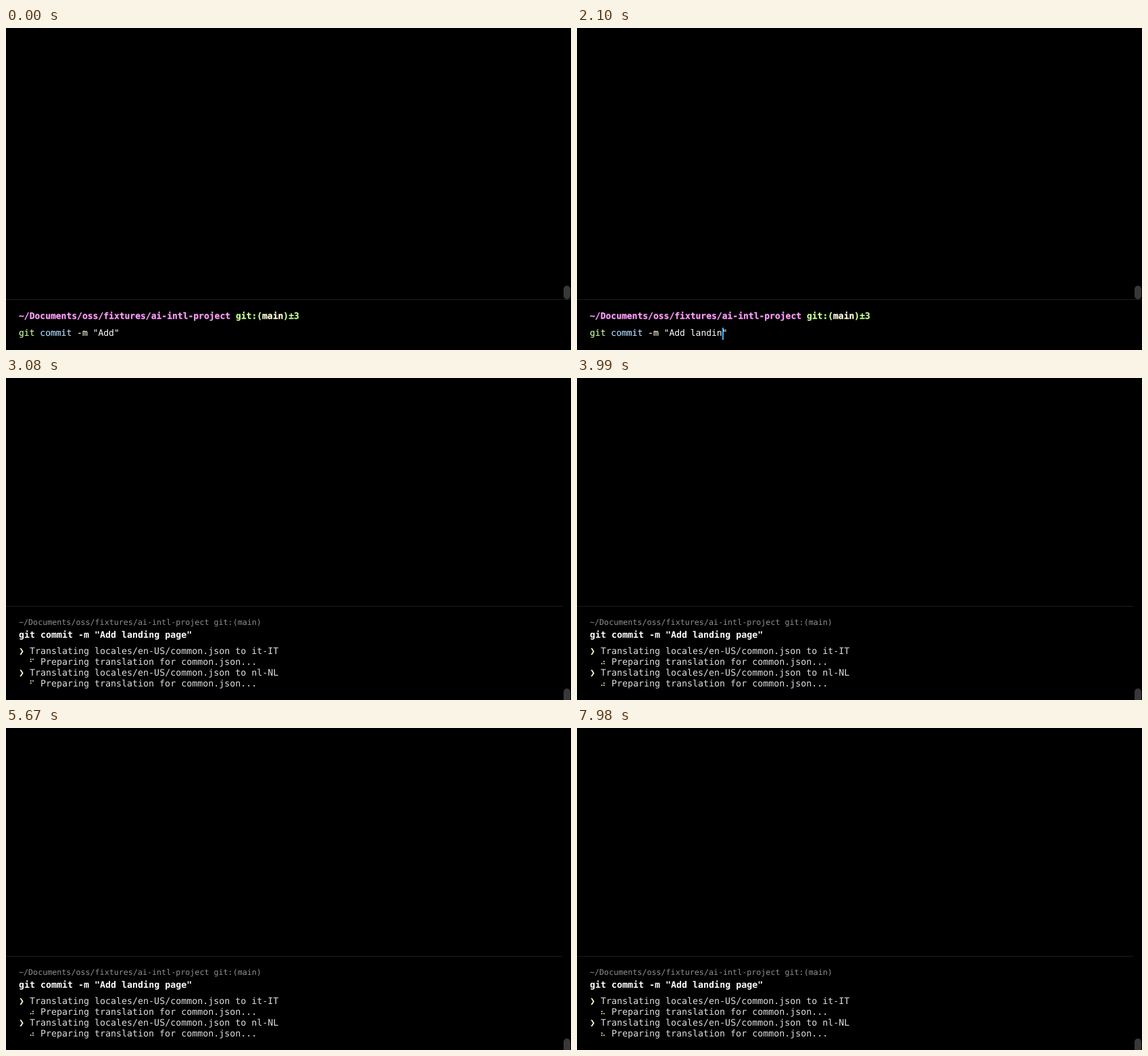
An HTML page for the animation above (8 s loop, 836 by 476 pixels).

```html
<!DOCTYPE html>
<html lang="en">
<head>
<meta charset="utf-8">
<title>Terminal commit</title>
<style>
  html, body { margin: 0; width: 100%; height: 100%; overflow: hidden; background: #000; }
  svg { display: block; width: 836px; height: 476px; }
  text { font: 13px "DejaVu Sans Mono", monospace; white-space: pre; text-rendering: geometricPrecision; fill: #fff; }
  .bold { font-weight: bold; stroke-width: 0.25px; }
  .path { fill: #ff9dfb; stroke: #ff9dfb; }
  .green { fill: #c9ff9a; stroke: #c9ff9a; }
  .cream { fill: #fefddc; stroke: #fefddc; }
  .blue { fill: #b4dcff; stroke: #b4dcff; }
  .typed { stroke-width: 0.15px; }
  .header { font-size: 11.7px; fill: #8f8f8f; }
  .command { font-size: 13.3px; font-weight: bold; }
  .output { font-size: 13.3px; fill: #dedede; }
  .pointer { font-size: 13.3px; fill: #fefdd0; }
  .dot { fill: #fefdd0; }
  .divider { fill: #1c1c1c; }
  .thumb { fill: #383838; }
</style>
</head>
<body>
<svg viewBox="0 0 836 476">
  <g id="editor">
    <rect class="divider" y="401" width="836" height="1"/>
    <rect class="thumb" x="825" y="381" width="10" height="20" rx="5"/>
    <rect id="caret" y="443" width="2.6" height="18" fill="#3a9be0"/>
    <text class="bold" x="19" y="430"><tspan class="path">~/Documents/oss/fixtures/ai-intl-project</tspan><tspan class="green"> git:(</tspan><tspan class="cream">main</tspan><tspan class="green">)±3</tspan></text>
    <text class="typed" x="19" y="455"><tspan class="green">git</tspan><tspan class="blue"> commit</tspan><tspan class="cream"> -m</tspan><tspan id="message"></tspan></text>
  </g>
  <g id="running">
    <g id="block">
      <rect class="divider" y="337" width="823" height="1"/>
      <text class="header" x="19" y="365">~/Documents/oss/fixtures/ai-intl-project git:(main)</text>
      <text class="command" x="19" y="384">git commit -m "Add landing page"</text>
    </g>
    <g id="tasks"></g>
    <rect class="thumb" x="825" y="459" width="10" height="24" rx="5"/>
  </g>
</svg>
<script>
const LOOP = 8000, STEP = 70;
const CELL = 13 * 0.60205, LEFT = 19, PREFIX = 'git commit -m "'.length;
const MESSAGE = "Add landing page";
const SUBMIT = 2800, RUN = 2870, OUTPUT = 3080;

// [time, typed characters]
const TYPING = [[0, 3], [1330, 4], [1470, 5], [1610, 6], [1680, 7], [1820, 8], [1960, 9],
  [2100, 10], [2240, 12], [2520, 14], [2660, 15], [2730, 16]];

// Braille dots are numbered 1-3 down the left column and 4-6 down the right.
const SPINNER = ["124", "145", "1456", "456", "3456", "356", "236", "1236", "123", "1234"];
const SPINNER_RATE = 1.2287;

const $ = id => document.getElementById(id);
const show = (node, on) => node.setAttribute("visibility", on ? "inherit" : "hidden");

function add(parent, tag, attrs, content = "") {
  const node = document.createElementNS("http://www.w3.org/2000/svg", tag);
  for (const key in attrs) node.setAttribute(key, attrs[key]);
  node.textContent = content;
  return parent.appendChild(node);
}

const dots = [];
["it-IT", "nl-NL"].forEach((locale, i) => {
  const y = 408 + i * 32, tasks = $("tasks");
  add(tasks, "text", { class: "pointer", x: 19, y }, "❯");
  add(tasks, "text", { class: "output", x: 35, y }, `Translating locales/en-US/common.json to ${locale}`);
  add(tasks, "text", { class: "output", x: 51, y: y + 16 }, "Preparing translation for common.json...");
  for (let d = 0; d < 6; d++) {
    const node = add(tasks, "circle", {
      class: "dot", r: 0.95,
      cx: 36.8 + 3.2 * Math.floor(d / 3),
      cy: y + 7.7 + 3.3 * (d % 3)
    });
    dots.push({ node, id: String(d + 1) });
  }
});

function render(t) {
  const running = t >= RUN, output = t >= OUTPUT;
  show($("editor"), !running);
  show($("running"), running);
  show($("tasks"), output);
  $("block").setAttribute("transform", `translate(0 ${output ? 0 : 64})`);

  const typed = TYPING.filter(([time]) => time <= t).pop()[1];
  $("message").textContent = ` "${MESSAGE.slice(0, typed)}"`;
  $("caret").setAttribute("x", LEFT + (PREFIX + typed) * CELL);
  show($("caret"), (t >= 350 && t < 910) || (t >= 1330 && t < SUBMIT));

  const step = Math.max(0, Math.floor((t - OUTPUT) / STEP));
  const pattern = SPINNER[Math.floor(step * SPINNER_RATE) % SPINNER.length];
  for (const { node, id } of dots) show(node, pattern.includes(id));
}

const start = performance.now();
function tick() {
  render((performance.now() - start) % LOOP);
  requestAnimationFrame(tick);
}
tick();
</script>
</body>
</html>
```
